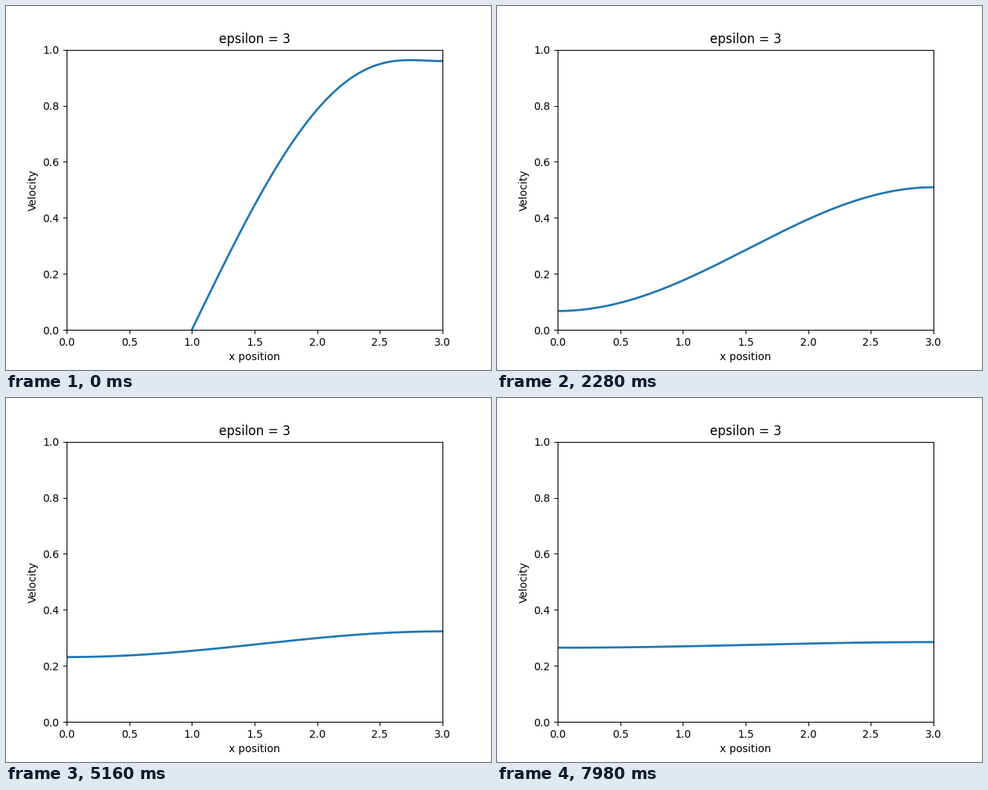
Recreate the animation shown at these times as a matplotlib script. Size 640 px wide and 480 px high, loop 8 s.

```python
import numpy as np
import matplotlib.pyplot as plt
from matplotlib.animation import FuncAnimation

EPSILON = 3
LENGTH = 3.0
POINTS = 301
DT = 0.01          # simulated time per step
STEP_MS = 60       # screen time per step
LOOP_MS = 8000
INTERVAL = 40
WARM_UP = 2        # steps already taken when the loop begins

x = np.linspace(0, LENGTH, POINTS)
dx = x[1] - x[0]


def operators():
    """First and second derivative matrices with zero-slope ends."""
    up, down = np.eye(POINTS, k=1), np.eye(POINTS, k=-1)
    up[-1, -1] = down[0, 0] = 1
    grad = (up - down) / (2 * dx)
    lap = (up + down - 2 * np.eye(POINTS)) / dx**2
    return grad, lap


def solve_burgers(steps):
    """Viscous Burgers equation, semi-implicit in time."""
    grad, lap = operators()
    diffusion = np.eye(POINTS) - DT * EPSILON * lap
    u = np.sin(x - 1)
    states = [u]
    for _ in range(steps):
        u = np.linalg.solve(diffusion + DT * u[:, None] * grad, u)
        states.append(u)
    return states


states = solve_burgers(LOOP_MS // STEP_MS + WARM_UP)[WARM_UP:]

plt.rcParams["font.family"] = "DejaVu Sans"
fig, ax = plt.subplots(figsize=(6.4, 4.8), dpi=100)
ax.set(xlim=(0, LENGTH), ylim=(0, 1), xlabel="x position",
       ylabel="Velocity", title=f"epsilon = {EPSILON}")
line, = ax.plot(x, states[0], lw=2, color="tab:blue")


def update(i):
    step = (i * INTERVAL + INTERVAL // 2) // STEP_MS
    line.set_ydata(states[step])
    return line,


anim = FuncAnimation(fig, update, frames=LOOP_MS // INTERVAL,
                     interval=INTERVAL, repeat=True, repeat_delay=0)
plt.show()
```
